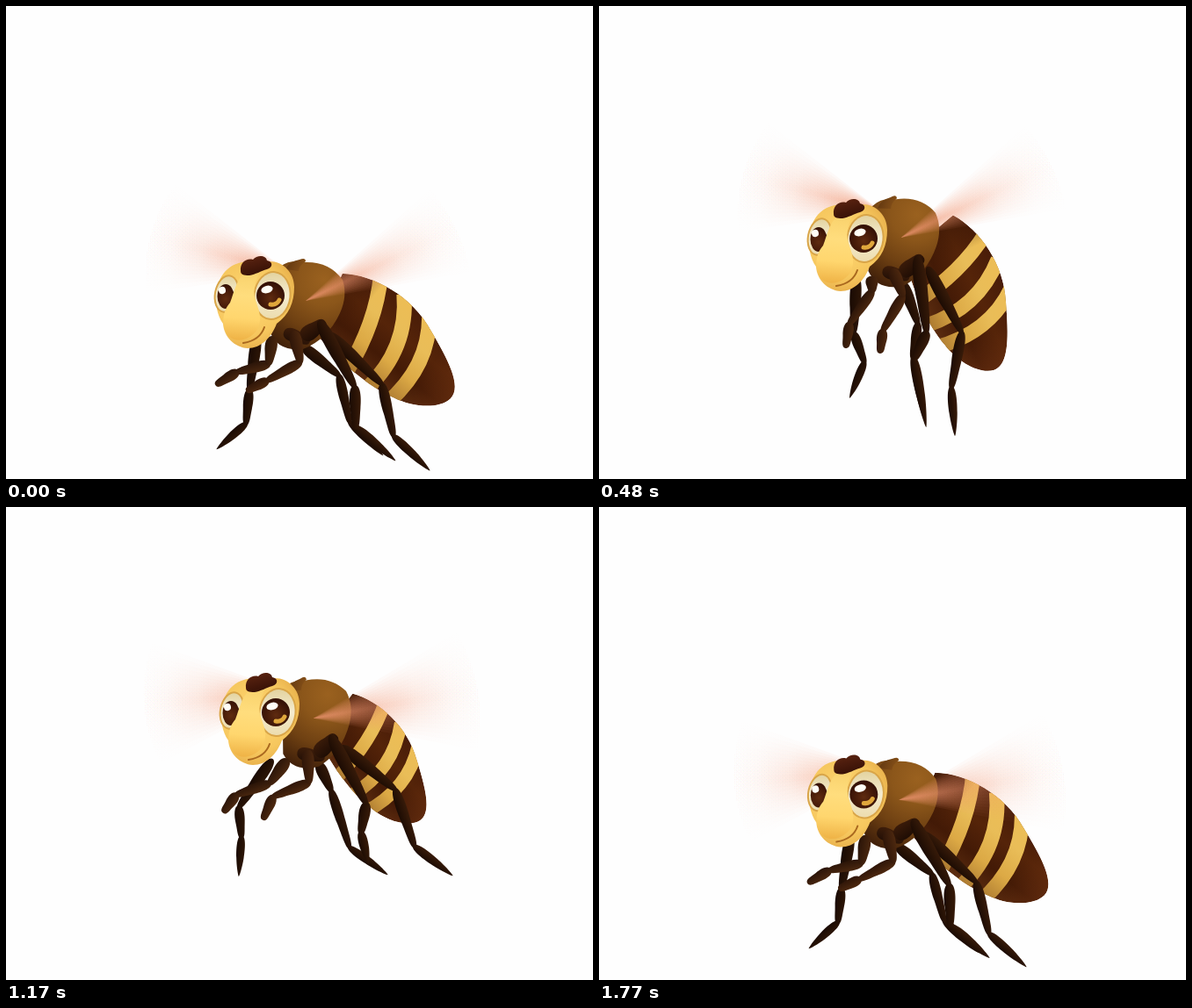
An HTML page with a canvas that plays this animation: 668x539 px, repeating every 1.8 s.

```html
<!DOCTYPE html>
<html lang="en">
<head>
<meta charset="utf-8">
<title>Flying bee</title>
<style>
html, body { margin: 0; width: 100%; height: 100%; overflow: hidden; background: #fefefe; }
canvas { display: block; }
</style>
</head>
<body>
<canvas id="stage" width="668" height="539"></canvas>
<script>
const ctx = document.getElementById('stage').getContext('2d');
const LOOP = 1800, STEP = 30;
const TIMES = [0, 210, 480, 720, 1170, 1410];

// Smooth periodic curve through one row of values per key time.
function pose(rows, t) {
  const n = TIMES.length;
  const time = i => TIMES[(i + n) % n] + LOOP * Math.floor(i / n);
  const row = i => rows[(i + n) % n];
  let i = n - 1;
  while (TIMES[i] > t) i--;
  const span = time(i + 1) - time(i), u = (t - time(i)) / span;
  const slope = (k, c) => (row(k + 1)[c] - row(k - 1)[c]) / (time(k + 1) - time(k - 1)) * span;
  return row(i).map((a, c) => {
    const b = row((i + 1) % n)[c], ma = slope(i, c), mb = slope((i + 1) % n, c);
    return a + u * (ma + u * (3 * (b - a) - 2 * ma - mb + u * (2 * (a - b) + ma + mb)));
  });
}

const head = [[0, 0], [-2, -11.5], [0, -65], [2, -97], [6, -96], [4, -56]];
// x, y, degrees
const thorax = [[0, 0, 0], [-1, -16, -3], [1, -72, -6], [3, -102, -10], [6, -95, -10], [4, -54, -6]];
// x, y, degrees, scale
const abdomen = [[375, 345, 39, 1], [375, 333, 49, 1], [379, 270, 65, .97],
  [383, 240, 67, .93], [380, 245, 52, .87], [376, 290, 34, .92]];

// Knee, ankle and toe of each leg.
const farFront = { hip: [303, 378], w: 14, paw: true, color: ['#4a270f', '#2a1408'], rows: [
  [299, 408, 263, 417, 240, 431], [303, 392, 270, 410, 257, 432], [311, 325, 285, 362, 281, 388],
  [310, 298, 283, 332, 282, 359], [300, 315, 262, 328, 248, 347], [298, 357, 258, 357, 234, 372]] };
const nearFront = { hip: [328, 372], w: 14, paw: true, color: ['#4d280f', '#2e1508'], rows: [
  [335, 406, 297, 427, 275, 438], [338, 386, 303, 415, 291, 437], [346, 330, 323, 370, 320, 394],
  [350, 300, 326, 340, 324, 366], [345, 314, 304, 330, 293, 355], [341, 357, 294, 366, 275, 379]] };
const farMid = { hip: [286, 375], w: 13, color: ['#2d1607', '#190a03'], rows: [
  [277, 438, 273, 476, 241, 504], [288, 432, 289, 463, 261, 495], [290, 373, 302, 406, 286, 445],
  [285, 346, 299, 374, 297, 416], [265, 342, 268, 376, 265, 419], [265, 384, 264, 418, 243, 457]] };
const nearMid = { hip: [357, 360], w: 15, color: ['#381b09', '#1b0b03'], rows: [
  [397, 434, 398, 480, 442, 517], [377, 432, 373, 461, 413, 522], [373, 372, 359, 402, 372, 478],
  [380, 338, 360, 392, 374, 446], [410, 338, 404, 371, 412, 405], [413, 374, 412, 412, 438, 442]] };
const farHind = { hip: [338, 388], w: 13, color: ['#321808', '#1b0b03'], rows: [
  [379, 421, 391, 474, 428, 511], [378, 411, 374, 456, 405, 515], [363, 362, 357, 401, 370, 470],
  [363, 329, 357, 395, 373, 446], [370, 323, 391, 388, 433, 418], [378, 362, 408, 414, 459, 436]] };
const nearHind = { hip: [368, 374], w: 14, color: ['#381b09', '#1b0b03'], rows: [
  [428, 431, 441, 490, 481, 528], [415, 424, 418, 487, 441, 534], [413, 372, 401, 435, 405, 488],
  [420, 337, 414, 402, 423, 454], [443, 322, 465, 387, 507, 419], [442, 362, 474, 418, 523, 439]] };

const shape = {
  abdomen: 'M-19-36C10-58 60-66 100-49C135-36 168-22 166-3C164 14 140 32 115 37C85 46 40 44 0 36Z',
  thorax: 'M312 297Q324 288 340 292Q368 291 383 312Q389 330 380 350Q366 380 338 391Q308 394 300 370Z',
  bump: 'M318 300Q322 291 334 289Q341 286 341 291Q334 295 333 302Z',
  head: 'M252 300C262 290 280 290 292 292C312 287 328 302 328 320C328 338 322 352 308 362' +
    'C302 378 290 390 275 390C260 389 248 377 247 362C240 352 238 340 240 325C241 314 246 305 252 300Z',
  muzzle: 'M272 304C262 312 260 325 255 338C245 349 245 367 254 377C263 384 279 381 287 367' +
    'C292 355 287 345 284 335C280 322 284 312 290 302Z',
  tuft: 'M267 302C266 292 274 287 281 289C286 283 296 284 297 290C304 291 304 298 297 300' +
    'C290 302 284 306 277 307C270 307 267 306 267 302Z',
  smile: 'M270 384Q289 381 294 366'
};
for (const key in shape) shape[key] = new Path2D(shape[key]);

function stops(g, colors) {
  colors.forEach((c, i) => g.addColorStop(i / (colors.length - 1), c));
  return g;
}
const linear = (x0, y0, x1, y1, ...colors) => stops(ctx.createLinearGradient(x0, y0, x1, y1), colors);
const radial = (x, y, r, ...colors) => stops(ctx.createRadialGradient(x, y, 0, x, y, r), colors);

function fill(path, style) {
  ctx.fillStyle = style;
  ctx.fill(path);
}

function oval(x, y, rx, ry, turn = 0) {
  const p = new Path2D();
  p.ellipse(x, y, rx, ry, turn, 0, 7);
  return p;
}

function scoped(draw) {
  ctx.save();
  draw();
  ctx.restore();
}

function segment(x0, y0, x1, y1, w, end, colors) {
  scoped(() => {
    const len = Math.hypot(x1 - x0, y1 - y0), h = w / 2;
    ctx.translate(x0, y0);
    ctx.rotate(Math.atan2(y1 - y0, x1 - x0));
    const p = new Path2D();
    p.moveTo(-2, 0);
    p.bezierCurveTo(-2, -h, len * .25, -h * 1.15, len * .55, -h * .9);
    p.bezierCurveTo(len * .8, -h * .7, len + 2, -h * end, len + 2, 0);
    p.bezierCurveTo(len + 2, h * end, len * .8, h * .7, len * .55, h * .9);
    p.bezierCurveTo(len * .25, h * 1.15, -2, h, -2, 0);
    fill(p, linear(0, -h, 0, h, ...colors));
  });
}

function attach([x, y], [dx, dy, deg]) {
  const a = deg * Math.PI / 180, c = Math.cos(a), s = Math.sin(a);
  x -= 341;
  y -= 320;
  return [341 + dx + x * c - y * s, 320 + dy + x * s + y * c];
}

function drawLeg(leg, t, body) {
  const [kx, ky, ax, ay, tx, ty] = pose(leg.rows, t), { w, color } = leg;
  segment(ax, ay, tx, ty, leg.paw ? w * .85 : w * .72, leg.paw ? .9 : .15, color);
  segment(kx, ky, ax, ay, w * .86, .8, color);
  segment(...attach(leg.hip, body), kx, ky, w, .7, color);
}

// Motion blur: nested wedges make the middle of the sweep densest.
function drawWing([x, y], mid, spread, reach) {
  const tone = a => `rgba(240,150,115,${a})`;
  ctx.fillStyle = radial(x, y, reach, tone(.15), tone(.09), tone(.05), tone(.025), tone(.009), tone(0));
  for (let i = 1; i <= 10; i++) {
    const half = spread * i / 10 * Math.PI / 180, a = mid * Math.PI / 180;
    ctx.beginPath();
    ctx.moveTo(x, y);
    ctx.arc(x, y, reach, a - half, a + half);
    ctx.fill();
  }
}

function drawAbdomen([x, y, deg, scale]) {
  scoped(() => {
    ctx.translate(x, y);
    ctx.rotate(deg * Math.PI / 180);
    ctx.scale(scale, scale);
    ctx.clip(shape.abdomen);
    fill(shape.abdomen, linear(0, -55, 0, 42, '#4a1d08', '#552409', '#431a06', '#5c2d10'));
    ctx.lineWidth = 17;
    ctx.strokeStyle = linear(0, -60, 0, 44, '#edbd55', '#e9bd58', '#dca945', '#ab7930');
    for (const [x0, cx, x1] of [[16, 46, 55], [50, 93, 85], [87, 125, 113]]) {
      ctx.beginPath();
      ctx.moveTo(x0, -62);
      ctx.quadraticCurveTo(cx, -17, x1, 48);
      ctx.stroke();
    }
    fill(shape.abdomen, linear(125, 0, 168, 0, 'rgba(110,50,18,0)', 'rgba(110,50,18,.55)'));
    fill(shape.abdomen, linear(-20, 0, 25, 0, 'rgba(60,24,6,.65)', 'rgba(60,24,6,0)'));
  });
}

function drawThorax([dx, dy, deg]) {
  scoped(() => {
    ctx.translate(341 + dx, 320 + dy);
    ctx.rotate(deg * Math.PI / 180);
    ctx.translate(-341, -320);
    fill(shape.thorax, radial(362, 312, 88, '#9a611f', '#8b561a', '#6e4012', '#42210a'));
    fill(shape.bump, linear(318, 290, 341, 300, '#5e350f', '#8b541a'));
    segment(318, 372, 344, 382, 15, .8, ['#3f1e0a', '#241006']);
    segment(338, 377, 362, 361, 18, .9, ['#3a1b09', '#1f0d04']);
  });
}

function drawEye(x, y, rx, ry, turn, iris, lid) {
  scoped(() => {
    const eye = oval(x, y, rx, ry, turn), top = y - ry - 2, tall = 2 * ry + 4;
    fill(oval(x, y, rx + 2, ry + 2, turn), '#d9a548');
    fill(eye, linear(x, y - ry, x, y + ry, '#e3d3a0', '#f5ecd0', '#ecdcae'));
    ctx.clip(eye);
    fill(oval(iris.x, iris.y, iris.r, iris.ry), radial(iris.x, iris.y + 3, 17, '#5f2b10', '#4a1d0a', '#351106'));
    ctx.strokeStyle = '#e0a73c';
    ctx.lineWidth = 5;
    ctx.lineCap = 'round';
    if (iris.r > 12) {
      ctx.beginPath();
      ctx.moveTo(iris.x, iris.y + 10);
      ctx.quadraticCurveTo(iris.x + 7, iris.y + 11, iris.x + 10, iris.y + 5);
      ctx.stroke();
    }
    fill(oval(iris.x - 4, iris.y - 7, iris.r * .42, 4.2, -.25), '#fffdf6');
    if (lid > 0) {
      const edge = top + tall * lid * .75;
      ctx.fillStyle = linear(x, top, x, edge, '#c38a2b', '#99621a');
      ctx.fillRect(x - 40, top, 80, edge - top);
      ctx.fillStyle = '#56280c';
      ctx.fillRect(x - 40, edge - 1, 80, 2);
      ctx.fillStyle = '#b47a24';
      ctx.fillRect(x - 40, top + tall * (1 - lid * .25), 80, tall);
    }
  });
}

function drawHead([dx, dy], lid) {
  scoped(() => {
    ctx.translate(dx, dy);
    fill(shape.head, radial(276, 334, 62, '#ffdc7c', '#fbd06a', '#f6c75e', '#e5ab47'));
    drawEye(251, 328, 12, 20, .2, { x: 250, y: 331, r: 9.5, ry: 14 }, lid);
    drawEye(303, 330, 19.5, 26, .12, { x: 301, y: 330, r: 16, ry: 16 }, lid);
    fill(shape.muzzle, linear(272, 304, 266, 382, '#f9d26d', '#ffdd7d', '#ffd66e', '#eeb144'));
    ctx.strokeStyle = '#a9681f';
    ctx.lineWidth = 2;
    ctx.lineCap = 'round';
    ctx.stroke(shape.smile);
    fill(shape.tuft, linear(280, 284, 286, 307, '#5c2411', '#351006'));
  });
}

function draw(now) {
  const frame = Math.floor(now % LOOP / STEP), t = frame * STEP;
  const body = pose(thorax, t), wide = frame % 2;
  const lid = Math.max(0, 1 - Math.abs(t - 780) / 110);
  ctx.fillStyle = '#fefefe';
  ctx.fillRect(0, 0, 668, 539);
  drawWing(attach([322, 304], body), wide ? 176 : 195, wide ? 24 : 23, wide ? 178 : 172);
  drawLeg(farMid, t, body);
  drawLeg(farHind, t, body);
  drawAbdomen(pose(abdomen, t));
  drawThorax(body);
  drawLeg(nearHind, t, body);
  drawLeg(nearMid, t, body);
  drawWing(attach([341, 336], body), wide ? -10 : -26, wide ? 21 : 16, 200);
  drawLeg(farFront, t, body);
  drawLeg(nearFront, t, body);
  drawHead(pose(head, t), lid);
}

const start = performance.now();
function tick() {
  draw(performance.now() - start);
  requestAnimationFrame(tick);
}
tick();
</script>
</body>
</html>
```
